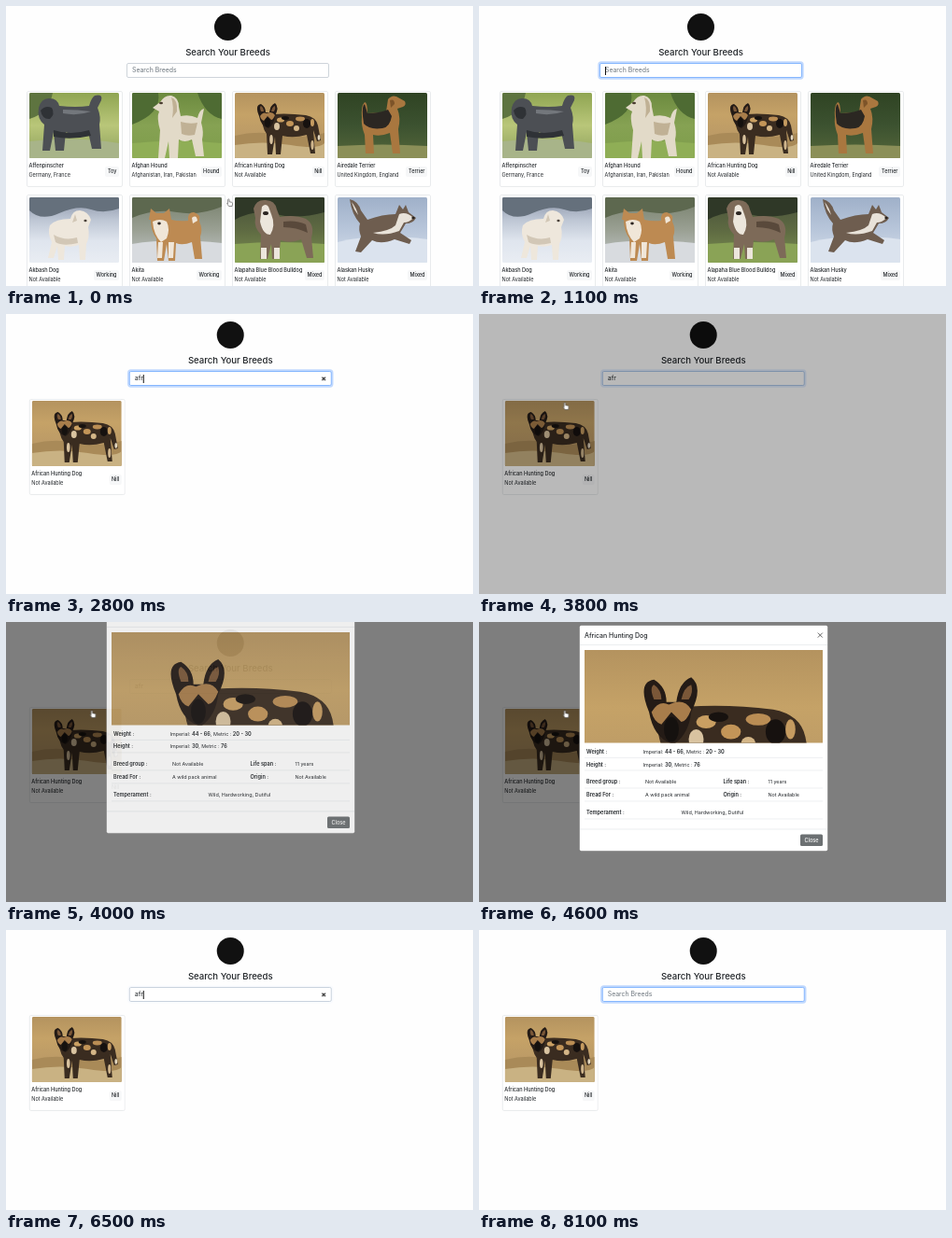
Recreate the animation shown at these times as an HTML page. Size 500 by 300 pixels, loop 8.6 s.

```html
<!DOCTYPE html>
<html lang="en">
<head>
<meta charset="utf-8">
<title>Search Your Breeds</title>
<style>
html, body { margin: 0; width: 100%; height: 100%; overflow: hidden; background: #fefefe; }
body { position: relative; font: 500 5.5px/8px Inter, sans-serif; color: #212529; }
body * { box-sizing: border-box; }
#page, #page > *, .card > *, .input > *, #shade, #modal, #hand { position: absolute; }
#page { left: 0; top: 0; width: 500px; height: 300px; }
svg { display: block; }

.logo { left: 222.5px; top: 7.5px; width: 29px; height: 29px; border-radius: 50%; background: #111; }
h1 { left: 137.5px; top: 43px; width: 200px; margin: 0; text-align: center; font: 500 9.6px/14px Inter, sans-serif; }

.input { left: 129px; top: 61px; width: 217px; height: 16px; border: 1px solid #ced4da; border-radius: 2px; background: #fff; font: 400 6.9px/14px Inter, sans-serif; }
.input > * { left: 5px; top: 0; }
.hint { color: #6c757d; white-space: nowrap; }
.typed { white-space: nowrap; }
.caret { width: .8px; height: 9px; margin-top: 2.5px; background: #111; }
.input > .clear { left: 204.5px; top: 4.8px; }

.card { width: 103px; height: 103px; border: 1px solid #e9ebed; border-radius: 2px; background: #fff; white-space: nowrap; }
.card svg { left: 2px; top: 1.5px; border-radius: 1.5px; }
.card b { left: 2px; top: 75.5px; font-weight: 500; font-size: 5.55px; }
.card i { left: 2px; top: 85.5px; font-style: normal; font-weight: 400; }
.card span { right: 2.5px; top: 80px; padding: 0 2.5px; line-height: 11px; border-radius: 2px; background: #f6f7f8; }

#shade { inset: 0; background: #000; }
#modal { left: 107px; top: 3px; }
#hand { left: 0; top: 0; }
text { font-family: Inter, sans-serif; dominant-baseline: central; fill: #212529; white-space: pre; }
.bold { font-weight: 600; font-size: 5.6px; }
.plain { font-weight: 400; font-size: 5.4px; }

/* one shared 8.6 s clock */
.step { animation: 8.6s step-end infinite; }
.glide { animation: 8.6s linear infinite; }
#page { animation-name: shift; }
.input { animation-name: focus; }
.hint { animation-name: hint; }
.a { animation-name: key-a; }
.f { animation-name: key-f; }
.r { animation-name: key-r; }
.caret { animation-name: caret; }
.clear { animation-name: clear; }
.starts-af { animation-name: drop-late; }
.starts-afr { animation-name: regroup; }
.other { animation-name: drop-early; }
#shade { animation-name: shade; }
#modal { animation: fade 8.6s linear infinite, slide 8.6s ease-out infinite; }
.button { animation-name: hover; }
#hand { animation: move 8.6s ease-in-out infinite, show 8.6s step-end infinite; }

@keyframes shift { 0% { transform: none } 28.953%, 100% { transform: translateX(2.75px) } }
@keyframes focus {
  0%, 10.93%, 44.988%, 75.465% { border-color: #ced4da; box-shadow: 0 0 0 1.7px rgba(13,110,253,0) }
  12.674%, 43.244%, 77.209%, 100% { border-color: #86b7fe; box-shadow: 0 0 0 1.7px rgba(13,110,253,.25) }
}
@keyframes hint { 0% { opacity: 1 } 18.488% { opacity: 0 } 88.256%, 100% { opacity: 1 } }
@keyframes key-a { 0% { opacity: 0 } 18.488% { opacity: 1 } 88.256%, 100% { opacity: 0 } }
@keyframes key-f { 0% { opacity: 0 } 20.814% { opacity: 1 } 87.093%, 100% { opacity: 0 } }
@keyframes key-r { 0% { opacity: 0 } 24.302% { opacity: 1 } 84.767%, 100% { opacity: 0 } }
@keyframes caret {
  0% { opacity: 0; left: 5px }
  10.93% { opacity: 1; left: 5px }
  17.326% { opacity: 0; left: 5px }
  18.488% { opacity: 1; left: 9px }
  20.814% { opacity: 1; left: 11.6px }
  24.302% { opacity: 1; left: 14.3px }
  38.256% { opacity: 0; left: 14.3px }
  75.465% { opacity: 1; left: 14.3px }
  81.279% { opacity: 0; left: 14.3px }
  84.767% { opacity: 1; left: 11.6px }
  87.093% { opacity: 1; left: 9px }
  88.256% { opacity: 1; left: 5px }
  94.07%, 100% { opacity: 0; left: 5px }
}
@keyframes clear { 0% { opacity: 0 } 18.488% { opacity: 1 } 43.244% { opacity: 0 } 75.465% { opacity: 1 } 88.256%, 100% { opacity: 0 } }
@keyframes drop-early { 0% { opacity: 1 } 28.953%, 100% { opacity: 0 } }
@keyframes drop-late { 0% { opacity: 1 } 31.279%, 100% { opacity: 0 } }
@keyframes regroup { 0% { transform: none } 31.279%, 100% { transform: translateX(-220px) } }
@keyframes shade { 0%, 43.244%, 71.047%, 100% { opacity: 0 } 44.988%, 69.302% { opacity: .5 } }
@keyframes fade { 0%, 44.988%, 67.442%, 100% { opacity: 0 } 46.733%, 65.698% { opacity: 1 } }
@keyframes slide { 0%, 44.988%, 69.186%, 100% { transform: translateY(-50px) } 48.477%, 65.698% { transform: none } }
@keyframes hover { 0% { fill: #6c7072 } 61.2% { fill: #5c6064 } 69.186%, 100% { fill: #6c7072 } }
@keyframes move {
  0%, 1.1% { transform: translate(236px, 206px) }
  6.9%, 38.256% { transform: translate(200px, 66px) }
  42.442%, 56.86% { transform: translate(89.5px, 94px) }
  61.512%, 68.5% { transform: translate(354px, 231px) }
  71.9%, 100% { transform: translate(200px, 66px) }
}
@keyframes show { 0% { opacity: 1 } 6.9% { opacity: 0 } 38.256% { opacity: 1 } 71.9%, 100% { opacity: 0 } }
</style>
</head>
<body>
<div id="page" class="step">
  <div class="logo"></div>
  <h1>Search Your Breeds</h1>
  <div class="input glide">
    <span class="hint step">Search Breeds</span>
    <span class="typed"><span class="a step">a</span><span class="f step">f</span><span class="r step">r</span></span>
    <span class="caret step"></span>
    <svg class="clear step" width="5" height="5"><path d="M.6.6l3.6 3.6M4.2.6L.6 4.2" stroke="#222" stroke-width="1.2"/></svg>
  </div>
</div>

<div id="shade" class="glide"></div>

<svg id="modal" width="267" height="243" viewBox="107 3 267 243">
  <rect x="107.5" y="3.5" width="266" height="242" rx="2" fill="#fff" stroke="#000" stroke-opacity=".2"/>
  <text x="113" y="14" font-size="6.95" font-weight="500">African Hunting Dog</text>
  <path d="M362.8 11.6l5 5m0-5l-5 5" stroke="#555" stroke-width=".9"/>
  <path d="M108 24.5h265M108 222h265" stroke="#dee2e6" stroke-width=".6"/>
  <path d="M113 145.5h255M113 159h255M113 178h255M113 192h255M113 211h255" stroke="#e3e6e9" stroke-width=".6"/>
  <svg id="hero" x="113" y="30" width="255" height="99.5" viewBox="0 0 96 37.46"></svg>
  <g class="bold">
    <text x="115" y="139">Weight :</text>
    <text x="115" y="152.5">Height :</text>
    <text x="115" y="171">Breed group :</text>
    <text x="261.5" y="171">Life span :</text>
    <text x="115" y="185">Bread For :</text>
    <text x="261.5" y="185">Origin :</text>
    <text x="115" y="204">Temperament :</text>
  </g>
  <g class="plain">
    <text x="175.5" y="139">Imperial: <tspan class="bold">44 - 66</tspan>, Metric : <tspan class="bold">20 - 30</tspan></text>
    <text x="175.5" y="152.5">Imperial: <tspan class="bold">30</tspan>, Metric : <tspan class="bold">76</tspan></text>
    <text x="178" y="171">Not Available</text>
    <text x="309.5" y="171">11 years</text>
    <text x="178" y="185">A wild pack animal</text>
    <text x="309.5" y="185">Not Available</text>
    <text x="216.5" y="204">Wild, Hardworking, Dutiful</text>
  </g>
  <rect class="button step" x="344" y="227.5" width="24" height="12.5" rx="1.5"/>
  <text x="356" y="234" font-size="5.5" text-anchor="middle" style="fill:#fff">Close</text>
</svg>

<svg id="hand" width="8" height="10"><path d="M1.6 1.4q.8-1 1.5 0v2.4l2.6.5q1 .3.9 1.4l-.5 2.8H2.6L.6 5.6q.2-.9 1 0z" fill="#fff" stroke="#444" stroke-width=".6"/></svg>

<script>
const path = (fill, d) => `<path fill="${fill}" d="${d}"/>`;
const spot = (fill, x, y, rx, ry) => `<ellipse fill="${fill}" cx="${x}" cy="${y}" rx="${rx}" ry="${ry}"/>`;
const sky = (id, ...tones) => `<linearGradient id="${id}" x2="0" y2="1">` +
  tones.map((c, i) => `<stop offset="${i / (tones.length - 1)}" stop-color="${c}"/>`).join('') +
  `</linearGradient><rect width="96" height="70" fill="url(#${id})"/>`;

const wildDog = id => sky(id, '#b4935f', '#c5a267', '#bb9a66', '#c2a97a') +
  path('#a98a58', 'M0 46q24-6 48-1t48-2v27H0z') +
  path('#c9b283', 'M0 56q30-5 60 0t36-2v16H0z') +
  path('#3a2c20', 'M30 24q22-3 46 0q11 2 13 11l3 16-4 1-4-12 2 25h-5l-4-20q-14 4-26 1l-2 20h-5l-1-19-3 19h-5l-1-22q-6-8-4-20z') +
  path('#241b16', 'M26 25q-5-12 2-13q5 3 5 9h4q1-8 6-10q5 4 0 14q-1 9-7 13q-8-2-10-13z') +
  path('#7a5738', 'M28 20q-2-5 0-6q3 2 3 6zM39 20q1-5 4-6q1 3-1 6z') +
  path('#a87d4b', 'M27 25q3-5 7-3q6-3 9 2q-2 5-4 5l-4-4-4 5q-3-1-4-5z') +
  spot('#15110f', 35, 32, 3, 5) +
  spot('#c99f62', 49, 29, 4, 2.6) + spot('#d9c3a0', 45, 36, 3, 4) +
  spot('#c39558', 59, 33, 4, 3) + spot('#17120f', 54, 27, 4, 2) +
  spot('#ba8d54', 70, 28, 5, 2.4) + spot('#d4b687', 66, 38, 3, 3) +
  spot('#16110f', 77, 33, 4, 5) + spot('#c59b60', 83, 32, 2, 4) +
  spot('#d8c29e', 39, 50, 1.8, 5) + spot('#cfb58c', 83, 56, 1.6, 5) + spot('#e4d8c0', 90, 48, 1.4, 3);

// name, origin, group, picture
const breeds = [
  ['Affenpinscher', 'Germany, France', 'Toy',
    sky('p0', '#8fa552', '#b9c679', '#8da05c') + path('#5e7440', 'M0 0h25q-4 22-25 28z') +
    path('#a8b489', 'M0 52q48-6 96 2v16H0z') +
    path('#4c4f54', 'M10 16q3-11 12-10q8 0 10 8q18 2 32 0q2-8 6-11q9-2 7 5l-4 8q4 10 2 18l2 26h-10l-4-18q-14 5-24 0l-2 20h-9l-2-20-4 20h-8l2-28q-8-6-6-18z') +
    path('#2f3236', 'M12 19q5-6 12-3q4 7-2 12q-8 1-10-9zM26 40q18 6 38 0l2 6q-22 5-40 1z') +
    path('#73777c', 'M36 18q16 0 30 2q-14 5-30 2z')],
  ['Afghan Hound', 'Afghanistan, Iran, Pakistan', 'Hound',
    sky('p1', '#6c8a3f', '#86a253', '#7d9c4a') + path('#4e6b33', 'M0 0h28q4 22-28 34zM70 0h26v28q-18-4-26-28z') +
    path('#8fae56', 'M0 54q48-5 96 0v16H0z') +
    path('#e2dac8', 'M30 10q5-8 12-7q8 2 8 12l2 10q10-2 18 2q2-9 7-10l-3 15q3 10 1 18l2 18h-9l-4-18q-8 4-14 0l-1 20h-9l-1-18-4 18h-7l2-30q-4-14-1-20l-7-4z') +
    path('#c0b195', 'M42 5q7 2 6 15l-5 7q2-12-1-22zM52 31q10 3 18 1l-3 13q-8 2-14-1z') +
    spot('#4b3d31', 31, 11, 2, 1.2)],
  ['African Hunting Dog', 'Not Available', 'Nill', wildDog('p2')],
  ['Airedale Terrier', 'United Kingdom, England', 'Terrier',
    sky('p3', '#2f4323', '#3c5230', '#55673a') + path('#8b8f58', 'M0 57q48-3 96 0v13H0z') +
    path('#a9773f', 'M26 26q-1-12 3-16q3 0 3 12q10 0 20-2l2-13q4-5 9-3l9 5q2 4-2 6l-6 2q4 10 1 22l2 26h-8l-3-22q-10 4-18 2l1 20h-9l-1-20q-4-10-3-19z') +
    path('#2b2722', 'M27 25q-1-11 2-13l3 10q12 0 22-4l4 7q-2 12-10 13q-14 2-20-5z') +
    path('#7d5429', 'M56 8q5-2 5 4l-4 4z')],
  ['Akbash Dog', 'Not Available', 'Working',
    sky('p4', '#8a93a6', '#bcc5d3', '#dfe5ee', '#e9edf3') + path('#65707c', 'M0 0h96v12q-16 6-30 1t-34 4T0 14z') +
    path('#eee7dc', 'M22 30q6-7 22-7q2-9 10-9q9 1 12 10l-3 8q2 10-2 18l-1 17h-6l-1-16q-8 3-15 1l-1 15h-6l-1-15-4 13h-6l4-17q-5-10-2-18z') +
    path('#d2c7b6', 'M26 40q12 7 25 3l1 6q-16 4-24-1zM49 18l-3 9 5-2z') + spot('#4a413a', 60, 25, 1.6, 1.2)],
  ['Akita', 'Not Available', 'Working',
    sky('p5', '#77806c', '#9aa093', '#c4c8cb') + path('#5d684f', 'M0 0h96v10q-24 10-48 6T0 22z') +
    path('#d8dbdf', 'M0 50q40-7 96-1v21H0z') +
    path('#bd8a52', 'M18 24l2-12 6 5h8l6-5 2 12q8 2 18 1q-1-9 6-9q8 2 6 10q4 8 1 16l2 24h-8l-3-18q-10 4-17 1l-1 19h-7l-2-18-3 18h-7l-1-24q-6-8-6-20z') +
    path('#f0e6d8', 'M22 26q8-4 15 0q4 8 0 18l-6 4q-8-8-9-22zM64 22q5-4 6 3l-5 3zM28 48h5l-1 17h-5zM39 48h6l-1 17h-5z') +
    spot('#2c2420', 29, 28, 1.8, 1.4)],
  ['Alapaha Blue Blood Bulldog', 'Not Available', 'Mixed',
    sky('p6', '#48513a', '#5e6a42', '#7c9150') + path('#2f3827', 'M0 0h96v16q-30 8-52 2T0 24z') +
    path('#8aa356', 'M0 50q48-4 96 0v20H0z') +
    path('#7d6a58', 'M20 12q3-10 13-9q10 0 12 10l3 8q16-3 28 2q10 6 6 20l2 22h-7l-6-20q-12 5-22 1l-2 20h-7l-1-16-4 16h-8l1-26q-8-8-6-18z') +
    path('#ece6dc', 'M29 10q4-4 7 0l3 8q5 12-1 22q-8 0-11-14zM28 54h6v12h-6zM42 54h6v12h-6z') +
    path('#59493b', 'M52 26q14-2 24 3l2 9q-12-6-26-6z') + spot('#2b2522', 33, 17, 3, 2)],
  ['Alaskan Husky', 'Not Available', 'Mixed',
    sky('p7', '#9fb0c9', '#b8c6da', '#d6dfeb') + path('#dbe3ee', 'M0 48q40-10 96-3v25H0z') +
    path('#6e5d4f', 'M13 2q9 2 12 12l7 10q16-6 30-6l4-10 4 5 3-5 3 8 8 6q-3 6-11 6l-6 10 12 8-2 4-16-5q-14 6-24 1l-12 13-6-1 6-16q-3-8-1-14-9-10-11-26z') +
    path('#e8e2d9', 'M66 18q8-3 15 4q-4 5-10 5l-5 9q-16 6-28 2 18-2 24-8zM15 5q5 6 7 14l-4-6z') +
    spot('#2a2421', 81, 22, 1.7, 1.2)]
];

const kinds = ['starts-af', 'starts-af', 'starts-afr'];
document.getElementById('page').insertAdjacentHTML('beforeend', breeds.map(([name, origin, group, art], i) => `
  <div class="card step ${kinds[i] || 'other'}" style="left:${21.5 + i % 4 * 110}px;top:${90.5 + (i > 3) * 111.5}px">
    <svg width="96" height="70" viewBox="0 0 96 70">${art}</svg><b>${name}</b><i>${origin}</i><span>${group}</span>
  </div>`).join(''));
document.getElementById('hero').innerHTML = wildDog('big');
</script>
</body>
</html>
```
